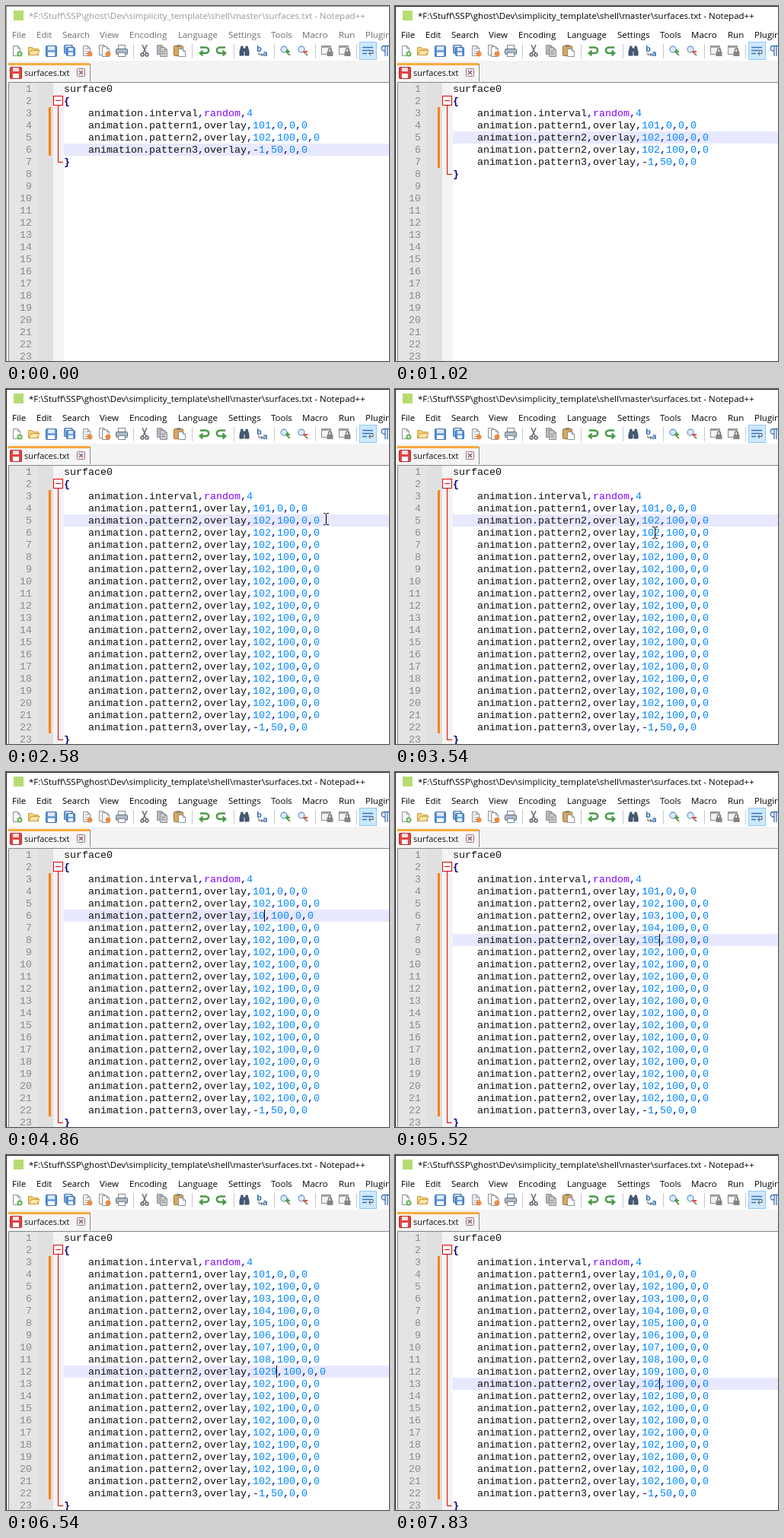
Animation of 503x467 px, one loop 8000 ms. Source, as an HTML page:

```html
<!DOCTYPE html>
<html lang="en">
<head>
<meta charset="utf-8">
<title>Editor</title>
<style>
  html, body { margin: 0; width: 100%; height: 100%; overflow: hidden; background: #fff; }
  svg { display: block; }
  .ui { font: 11.5px "Open Sans", "Noto Sans", sans-serif; fill: #111; }
  .ui.tab { font-size: 11px; }
  .caption { fill: #999; }
  .menu { fill: #6d6d6d; }
  .border { fill: #999; }
  .active .caption, .active .menu { fill: #000; }
  .active .border { fill: #222; }
  .code { font: 13.333px "Liberation Mono", "Courier New", monospace; fill: #111; }
  .gutter { fill: #8c8c8c; }
  .op { fill: #000080; }
  .brace { font-weight: bold; fill: #000080; }
  .num { fill: #0088ff; }
  .word { fill: #8000ff; }
  .glyph { font: 700 11px "Open Sans", sans-serif; fill: #3a6fb5; }
</style>
</head>
<body>
<svg id="stage" width="503" height="467" viewBox="0 0 503 467"></svg>
<script>
const LOOP = 8000, ROWS = 23, ROW_H = 16, TOP = 101, CLICK = 450;
const rowTop = n => TOP + ROW_H * (n - 1);
const rect = (x, y, w, h, fill, extra = '') =>
  `<rect x="${x}" y="${y}" width="${w}" height="${h}" fill="${fill}" ${extra}/>`;
const line = (d, color, width = 1, fill = 'none') =>
  `<path d="${d}" stroke="${color}" stroke-width="${width}" fill="${fill}"/>`;
const label = (x, y, s, kind) => `<text class="ui ${kind}" x="${x}" y="${y}">${s}</text>`;
const at = (x, y, s) => `<g transform="translate(${x} ${y})">${s}</g>`;

// Toolbar icons, each drawn around its own centre.
const page = (x = -5, y = -7, w = 10, h = 14, fill = '#fff') =>
  line(`M${x + .5} ${y + .5}h${w - 4}l3 3v${h - 4}h${1 - w}z`, '#8a8f98', 1, fill) +
  line(`M${x + w - 3.5} ${y + .5}v3h3`, '#8a8f98');
const dot = (x, y, color) => `<circle cx="${x}" cy="${y}" r="3.5" fill="${color}"/>`;
const rules = line('M-3-2.5h5M-3 .5h6M-3 3.5h5', '#a9b3bd');
const disk = (x, y, s, color) =>
  rect(x + .5, y + .5, s - 1, s - 1, color, 'rx="1" stroke="#3f6fae"') +
  rect(x + 3, y + 1, s - 6, s * .35, '#dce9f8') +
  rect(x + 3, y + s * .58, s - 6, s * .35, '#fff');
const arrow = flip =>
  `<g transform="scale(${flip} 1)">` +
  line('M-5-4.5H2C7.5-4.5 7.5 3 2 3H-3', '#4a9a48', 2.5) +
  line('M-6.5 3L-2-1V7z', '#4a9a48', 1, '#4a9a48') + '</g>';
const lens = (sign, color) =>
  line('M1 1L6 6', '#9a8468', 2) +
  '<circle cx="-2" cy="-2" r="4" fill="#dcebfb" stroke="#6e9ed0" stroke-width="1.3"/>' +
  at(3, 1, line(sign, color, 2));
const lock = rect(-7.5, -6.5, 12, 11, '#f4f4f4', 'stroke="#8c8c8c"') +
  rect(-7, -6, 12, 2, '#a6a6a6') +
  line('M1.5 1v-2a2 2 0 0 1 4 0v2', '#777', 1.4) + rect(-.5, 1, 8, 6, '#858585');

const icons = [
  [14, page() + dot(4, 4, '#5cb050') + line('M4 2v4M2 4h4', '#fff')],
  [37, line('M-7.5 5.5v-10h5l2 2h6v8z', '#c79a3c', 1, '#f6d37a') +
       line('M-7 5.5l3-6h11l-3 6z', '#c79a3c', 1, '#fce5a5')],
  [60, disk(-8, -7, 15, '#5b94d6')],
  [83, disk(-7, -8, 12, '#84afe0') + disk(-4, -5, 12, '#5b94d6')],
  [106, page() + rules + dot(4, 4, '#ec8b45')],
  [129, page(-7, -8) + page(-3, -6) + dot(5, 4, '#ec8b45')],
  [152, rect(-4.5, -7.5, 9, 6, '#fff', 'stroke="#7c8796"') +
        rect(-7.5, -2.5, 15, 7, '#aeb9c8', 'rx="1" stroke="#5f6d80"') +
        rect(-4.5, 2.5, 9, 5, '#fff', 'stroke="#7c8796"')],
  [182, line('M-3-8L2 3M3-8L-2 3', '#70757c', 1.7) +
        line('M-3 3a2 2 0 1 0 .1 0M3 3a2 2 0 1 0 .1 0', '#555b65', 1.5)],
  [205, page(-7, -8, 10, 13, '#bbb') + page(-3, -5, 10, 13, '#ccc') +
        line('M-1 .5h5M-1 3.5h5', '#888')],
  [228, rect(-7.5, -6.5, 12, 13, '#d9a75c', 'rx="1" stroke="#9a7237"') +
        rect(-4, -8, 5, 3, '#888') + page(-2, -3, 10, 11)],
  [260, arrow(1)],
  [283, arrow(-1)],
  [313, line('M-4-6h2v3h4v-3h2L6 1v5H1V0h-2v6h-5V1z', '#394b63', 1, '#465a76')],
  [337, '<text class="glyph" x="-8" y="1">b</text><text class="glyph" x="0" y="7">a</text>' +
        line('M-5 2v3h4M-2 3l2 2-2 2', '#555')],
  [367, lens('M-3 0h6M0-3v6', '#4ba34a')],
  [390, lens('M-3 0h6', '#e05142')],
  [422, lock],
  [445, lock],
  [475, rect(-10.5, -11.5, 22, 23, '#cce8ff', 'stroke="#90c8f6"') +
        line('M-7-4.5H7M-7-.5H4M-7 3.5H-1', '#3a6fb5', 1.5) +
        line('M4-.5h3v4H2M4 1L1.5 3.5 4 6', '#555')],
  [498, line('M3 7V-6.5M0 7V-6.5M5-6.5H-1C-6-6.5-6 0-1 0H0', '#3a6fb5', 1.3)]
];

const menu = { File: 8, Edit: 40, Search: 74, View: 123, Encoding: 162, Language: 226,
  Settings: 292, Tools: 348, Macro: 389, Run: 437, Plugins: 472 };

function chrome() {
  let s = rect(0, 0, 503, 72, '#fff') + rect(0, 72, 503, 395, '#f3f3f3') +
    rect(3, 100, 500, 367, '#fff') +
    '<path class="border" d="M0 0H503V1H1V467H0z"/>' + rect(10, 6, 13, 13, '#b5dc70');
  s += label(30, 17, '*F:\\Stuff\\SSP\\ghost\\Dev\\simplicity_template\\shell\\master\\surfaces.txt - Notepad++', 'caption');
  for (const name in menu) s += label(menu[name], 42, name, 'menu');
  for (const x of [167, 244, 299, 352, 406, 460]) s += rect(x, 50, 1, 19, '#c8c8c8');
  for (const [x, art] of icons) s += at(x, 59, art);
  // Document tab
  s += rect(3, 75, 107, 24, '#f5f5f5') + rect(3, 75, 107, 3, '#faaa3c') +
    rect(110, 76, 1, 23, '#8c8c8c');
  s += at(13, 88, rect(-7.5, -7.5, 15, 15, '#e14444', 'rx="1" stroke="#b82828"') +
    rect(-4, -7, 8, 5, '#ffdede') + rect(-4, 1, 8, 6, '#fff'));
  s += label(24, 92, 'surfaces.txt', 'tab');
  s += rect(93.5, 82.5, 10, 10, '#f5eef1', 'rx="1" stroke="#967080"') +
    line('M96 85l5 5M101 85l-5 5', '#906078', 1.5);
  // Margins
  s += rect(4, 101, 38, 366, '#e4e4e4') + rect(42, 101, 20, 366, '#e0e0e0') +
    rect(62, 101, 14, 366, '#f4f4f4') + line('M503 100.5H3.5V467', '#828790');
  for (let n = 1; n <= ROWS; n++)
    s += `<text class="code gutter" text-anchor="end" x="34" y="${rowTop(n) + 12}">${n}</text>`;
  return s;
}

function colour(text) {
  return text.replace(/[a-z]+\d*|\d+|[^a-z\d]/g, token => {
    const kind = token === 'random' ? 'word' : /^\d/.test(token) ? 'num' :
      /^[a-z]/.test(token) ? '' : /[{}]/.test(token) ? 'brace' : 'op';
    return kind ? `<tspan class="${kind}">${token}</tspan>` : token;
  });
}

// Keystrokes: "<" backspace, "v" down, digits are typed.
const keys = '<3v<4v<5v<6v<7v<8v9<<9v';
const keyTimes = [4860, 4950, 5040, 5100, 5190, 5280, 5400, 5520, 5580,
  5760, 5850, 5910, 6060, 6150, 6240, 6300, 6390, 6480, 6540, 7050, 7200, 7410, 7830];

function rowCount(t) {
  if (t < 990) return 7;
  if (t < 1500) return 8;
  if (t < 2160) return Math.min(20, 9 + Math.floor((t - 1500) / 33));
  return t < 2310 ? 21 : t < 2520 ? 22 : 23;
}

function editor(t) {
  const count = rowCount(t), edited = {};
  let row = t < CLICK ? 6 : t < 4020 ? 5 : 6, value = '102';
  for (let i = 0; i < keys.length && t >= keyTimes[i]; i++) {
    if (keys[i] === 'v') { row++; value = '102'; }
    else value = keys[i] === '<' ? value.slice(0, -1) : value + keys[i];
    edited[row] = value;
  }
  const within = (a, b) => t >= a && t < b;
  const caretOn = within(CLICK, 990) || within(1500, 2160) || within(4020, 4590) || t >= 4860;
  const caretX = t < 4020 ? 411 : 323 + 8 * value.length;

  const text = n => n === 1 ? 'surface0' : n === 2 ? '{' : n === count ? '}' :
    n === 3 ? 'animation.interval,random,4' :
    n === 4 ? 'animation.pattern1,overlay,101,0,0,0' :
    n === count - 1 ? 'animation.pattern3,overlay,-1,50,0,0' :
    `animation.pattern2,overlay,${edited[n] ?? '102'},100,0,0`;

  const end = rowTop(count) + 8.5;
  let s = rect(76, rowTop(row), 427, ROW_H, '#e8e8ff') +
    rect(56, rowTop(3), 3, ROW_H * (count - 3), '#ff8000') +
    line(`M68.5 131V${end}H75`, '#e00000') +
    rect(62.5, 118.5, 12, 12, '#fff', 'stroke="#e00000"') + line('M65 124.5h7', '#e00000');
  for (let n = 1; n <= count; n++) {
    const x = n < 3 || n === count ? 76 : 108;
    s += `<text class="code" x="${x}" y="${rowTop(n) + 12}">${colour(text(n))}</text>`;
  }
  return s + (caretOn ? rect(caretX, rowTop(row), 1, ROW_H, '#000') : '');
}

// Pointer legs: start, end, from x, y, to x, y.
const legs = [
  [60, 420, 506, 300, 420, 173], [420, 990, 420, 173, 420, 173],
  [2580, 3300, 420, 171, 352, 187], [3300, 3540, 352, 187, 341, 189],
  [3540, 3630, 341, 189, 341, 189], [3630, 3930, 341, 189, 350, 189],
  [3930, 4200, 350, 189, 350, 189], [4200, 4320, 350, 189, 512, 201]
];

function pointer(t) {
  const leg = legs.find(([a, b]) => t >= a && t < b);
  if (!leg) return '';
  const [a, b, x0, y0, x1, y1] = leg, p = (t - a) / (b - a), k = p * p * (3 - 2 * p);
  const x = Math.round(x0 + (x1 - x0) * k), y = Math.round(y0 + (y1 - y0) * k);
  return at(x, y, line('M-3-7.5h2.5l1 1 1-1H4M.5-7v14M-3 7.5h2.5l1-1 1 1H4', '#000'));
}

const stage = document.getElementById('stage');
stage.innerHTML = chrome() + '<g id="live"></g>';
const live = document.getElementById('live');
let shown = '', began;

function draw(now) {
  began ??= now;
  const t = (now - began) % LOOP;
  stage.classList.toggle('active', t >= CLICK);
  const next = editor(t) + pointer(t);
  if (next !== shown) live.innerHTML = shown = next;
  requestAnimationFrame(draw);
}
requestAnimationFrame(draw);
</script>
</body>
</html>
```
